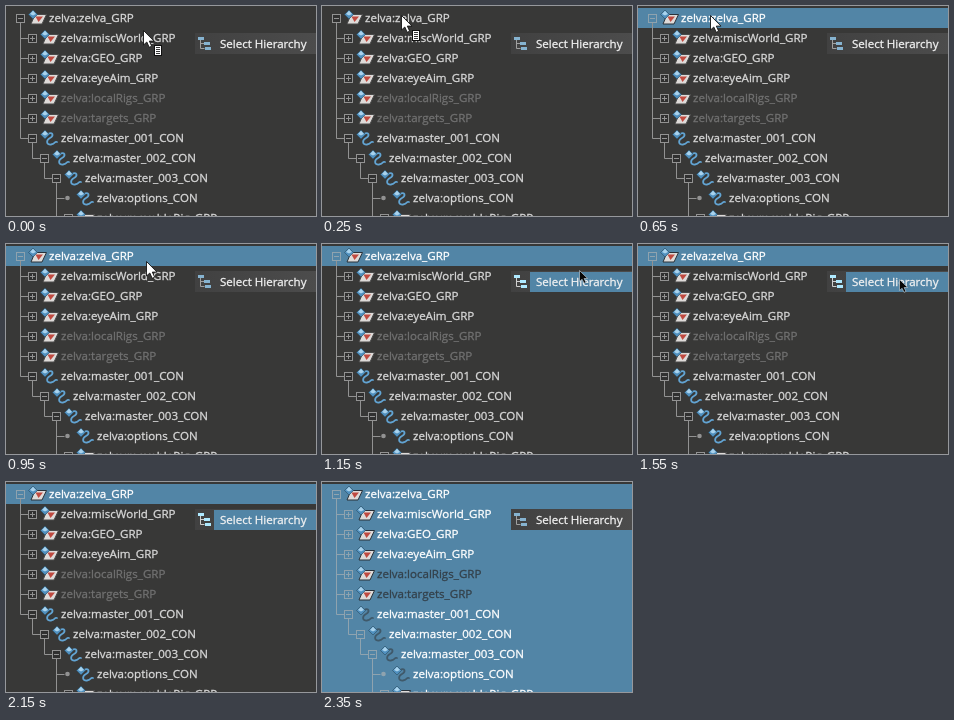
Animation of 310 by 210 pixels, one loop 3900 ms. Source, as an HTML page:

```html
<!DOCTYPE html>
<html lang="en">
<head>
<meta charset="utf-8">
<title>Select Hierarchy</title>
<style>
  html, body { margin: 0; width: 100%; height: 100%; overflow: hidden; background: #383837; }
  svg { display: block; width: 310px; height: 210px; }
  text { font: 11.55px "Open Sans", "Noto Sans", sans-serif; white-space: pre; stroke-width: .3px; }
  .row { --line: #929292; --text: #d8d8d8; --edge: #4a4a4a; --curve: #62a4d3; --box: #303030; }
  .row.dim { --text: #717171; }
  .row.on { --line: #8fa3af; --text: #fff; --edge: #29323a; --curve: #3f596a; --box: #5285a6; }
  .row.on.dim { --text: #33404a; }
  .row .bar { fill: none; }
  .row.on .bar { fill: #5285a6; }
  .row text { fill: var(--text); stroke: var(--text); }
  .line { fill: none; stroke: var(--line); }
  .box { fill: var(--box); stroke: var(--line); }
  .sheet { fill: #dedbd9; stroke: var(--edge); }
  .curve { fill: none; stroke: var(--curve); stroke-width: 1.8; stroke-linecap: round; }
  #menu text { fill: #f2f2f2; stroke: #f2f2f2; }
  #hot { fill: #5285a6; }
</style>
</head>
<body>
<svg viewBox="0 0 310 210">
  <linearGradient id="shade"><stop stop-color="#414141"/><stop offset="1" stop-color="#4c4c4c"/></linearGradient>
  <rect width="310" height="210" fill="#383837"/>
  <g id="tree"></g>
  <g id="menu">
    <rect x="189" y="27" width="121" height="21" fill="url(#shade)"/>
    <rect id="hot" x="208" y="28" width="102" height="20"/>
    <g id="list">
      <path d="M194.5 34v8.5h4M194.5 37.5h4" fill="none" stroke="#a0a0a0"/>
      <path d="M192 31h6v3h-6zM198 36h6v3h-6zM199 41h6v3h-6z" fill="#86b3d0"/>
    </g>
    <text x="214" y="42">Select Hierarchy</text>
  </g>
  <g id="cursor">
    <path id="arrow" stroke-linejoin="round"/>
    <g id="badge">
      <rect x="11.5" y="15.5" width="7" height="10" fill="#fff" stroke="#111"/>
      <path d="M13 17.5h4M13 19.5h4M13 21.5h4M13 23.5h4" stroke="#222" stroke-width=".9"/>
    </g>
  </g>
</svg>
<script>
const LOOP = 3900;
const $ = id => document.getElementById(id);

// label, depth, icon, expander, style
const rows = [
  ["zelva_GRP", 0, "group", "-"],
  ["miscWorld_GRP", 1, "group", "+"],
  ["GEO_GRP", 1, "group", "+"],
  ["eyeAim_GRP", 1, "group", "+"],
  ["localRigs_GRP", 1, "group", "+", "dim"],
  ["targets_GRP", 1, "group", "+", "dim"],
  ["master_001_CON", 1, "curve", "-"],
  ["master_002_CON", 2, "curve", "-"],
  ["master_003_CON", 3, "curve", "-"],
  ["options_CON", 4, "curve", "."],
  ["movableRig_GRP", 4, "group", "+"]
];

const gem = `<path d="M5-8l4.5 4.5L5 1 .5-3.5z" fill="#4f8fbe" stroke="#2d4c61" stroke-width=".6"/>
  <path d="M5-7.2l3 3.2-3 1.4-3-1.4z" fill="#a9d2ec"/>`;
const icons = {
  group: `<path class="sheet" d="M7-3.5h11.5l-4.5 9.5h-11z"/>
    <path d="M7.5-1.5h7.5l-4.5 5.5z" fill="#c04a40"/>` + gem,
  curve: `<path class="curve" d="M8-4C13-7 14-2 10 0S6 7 11 6.5 14 3 17 4"/>` + gem
};

function expander(kind, x) {
  if (kind === ".") return `<circle cx="${x - .5}" cy="0" r="2.3" fill="var(--line)"/>`;
  const plus = kind === "+" ? `M${x + .5}-2v5` : "";
  return `<rect class="box" x="${x - 3.5}" y="-3.5" width="8" height="8"/>
    <path class="line" d="M${x - 2} .5h5${plus}"/>`;
}

function branch(depth, i) {
  if (!depth) return "";
  const x = 2.5 + 12 * depth;
  const first = rows[i - 1][1] < depth;
  return `<path class="line" d="M${x} ${first ? -15 : -20}V.5h8"/>`;
}

$("tree").innerHTML = rows.map(([name, depth, icon, kind, style = ""], i) => {
  const x = 14 + 12 * depth;
  return `<g class="row ${style}" transform="translate(0 ${12 + 20 * i})">
    <rect class="bar" y="-10" width="310" height="20"/>
    ${branch(depth, i)}${expander(kind, x)}
    <g transform="translate(${x + 8} 0)">${icons[icon]}</g>
    <text x="${x + 29}" y="4">zelva:${name}</text></g>`;
}).join("");
const rowEls = [...document.querySelectorAll(".row")];

// time, tip x, tip y
const path = [
  [0, 137, 24], [50, 134, 24], [100, 126, 21], [150, 109, 15], [200, 90, 11],
  [250, 79, 9], [300, 74, 9], [350, 72, 9],
  [850, 78, 10], [900, 100, 13], [950, 140, 17], [1000, 185, 20], [1050, 225, 22],
  [1100, 248, 23], [1150, 257, 26], [1300, 259, 27],
  [1500, 263, 32], [1550, 261, 35], [1900, 252, 29], [2100, 260, 34]
];
const pointer = {
  tree: ["M.5 .5V15l3.3-3 2.4 5.3 2.5-1.1-2.4-5.1H11z", "#fff", "#151515"],
  menu: ["M.5 .5V11.5l2.6-2.2 1.9 4 2-.9-1.9-3.9h3.6z", "#080808", "#b9c7d0"]
};

function draw(now) {
  const t = now % LOOP;
  const [, x, y] = path.findLast(p => p[0] <= t);
  const over = t >= 1150 && t < 2350;
  const [shape, fill, edge] = pointer[over ? "menu" : "tree"];

  rowEls.forEach((row, i) => row.classList.toggle("on", t >= (i ? 2350 : 650)));
  $("hot").style.display = over ? "" : "none";
  $("list").style.filter = over ? "brightness(1.3)" : "";
  $("cursor").style.display = t < 2150 ? "" : "none";
  $("cursor").setAttribute("transform", `translate(${x} ${y})`);
  $("badge").style.display = t < 550 ? "" : "none";
  $("arrow").setAttribute("d", shape);
  $("arrow").setAttribute("fill", fill);
  $("arrow").setAttribute("stroke", edge);
  $("arrow").setAttribute("stroke-width", over ? .7 : .9);
}

const start = performance.now();
function tick() {
  draw(performance.now() - start);
  requestAnimationFrame(tick);
}
tick();
</script>
</body>
</html>
```
